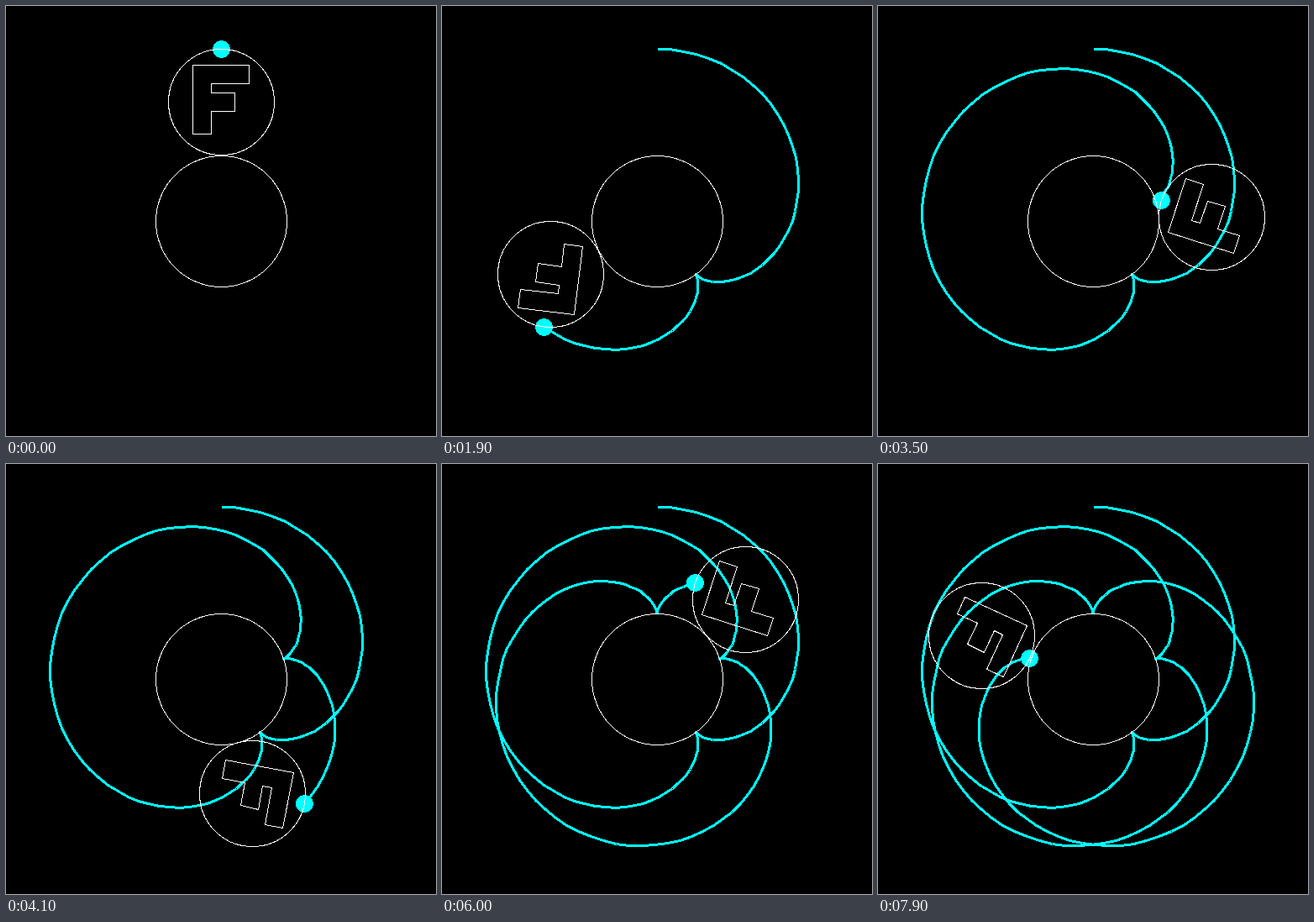
Animation of 512x512 px, one loop 8 s. Source, as an HTML page:

```html
<!DOCTYPE html>
<html lang="en">
<head>
<meta charset="utf-8">
<title>Rolling circle</title>
<style>
  html, body { margin: 0; width: 100%; height: 100%; overflow: hidden; background: #000; }
  svg { display: block; width: 100vw; height: 100vh; fill: none; shape-rendering: crispEdges; }
  .line { stroke: #fff; stroke-width: 1; }
  #trail { stroke: #0ff; stroke-width: 3; stroke-linejoin: round; }
  #pen { fill: #0ff; }
</style>
</head>
<body>
<svg viewBox="0 0 512 512">
  <path id="trail"/>
  <circle id="pen" r="10.5"/>
  <circle class="line" cx="256.5" cy="256.5" r="78"/>
  <circle id="roller" class="line" r="63"/>
  <path id="letter" class="line"/>
</svg>
<script>
  const CENTER = 256, ROLLER = 63, BASE = ROLLER * 5 / 4;
  const ORBIT = BASE + ROLLER, SPIN = ORBIT / ROLLER;
  const STEP_MS = 100, STEPS = 80, STEP_DEG = 12.8;
  const SUB = 4;            // trail points per step

  // Corners of the F around the roller's centre
  const LETTER = [
    [-33.6, -43.75], [33.6, -43.75], [33.6, -21.75], [-11.5, -21.75], [-11.5, -10.75],
    [16.5, -10.75], [16.5, 11.25], [-11.5, 11.25], [-11.5, 38.25], [-33.6, 38.25]
  ];

  const [trail, pen, roller, letter] =
    ['trail', 'pen', 'roller', 'letter'].map(id => document.getElementById(id));

  // Offset (x, y) turned clockwise and added to an origin
  function turn([ox, oy], [x, y], deg) {
    const a = deg * Math.PI / 180, c = Math.cos(a), s = Math.sin(a);
    return [ox + x * c - y * s, oy + x * s + y * c];
  }

  // Everything is drawn on whole pixels
  const snap = point => point.map(v => Math.floor(v + 1e-6) + 0.5);
  const path = points => 'M' + points.map(p => p.join(' ')).join('L');

  const hubAt = deg => turn([CENTER, CENTER], [0, -ORBIT], deg);
  const onRoller = (offset, deg) => snap(turn(hubAt(deg), offset, deg * SPIN));
  const penAt = deg => onRoller([0, -ROLLER], deg);

  const points = Array.from({ length: STEPS * SUB + 1 }, (_, i) => penAt(i * STEP_DEG / SUB));

  function place(circle, [x, y]) {
    circle.setAttribute('cx', x);
    circle.setAttribute('cy', y);
  }

  function draw(step) {
    const deg = step * STEP_DEG;
    place(pen, penAt(deg));
    place(roller, snap(hubAt(deg)));
    letter.setAttribute('d', path(LETTER.map(p => onRoller(p, deg))) + 'Z');
    trail.setAttribute('d', step ? path(points.slice(0, step * SUB + 1)) : '');
  }

  const start = performance.now();
  let shown = -1;

  function tick() {
    const step = Math.floor((performance.now() - start) / STEP_MS) % STEPS;
    if (step !== shown) draw(shown = step);
    requestAnimationFrame(tick);
  }
  tick();
</script>
</body>
</html>
```
